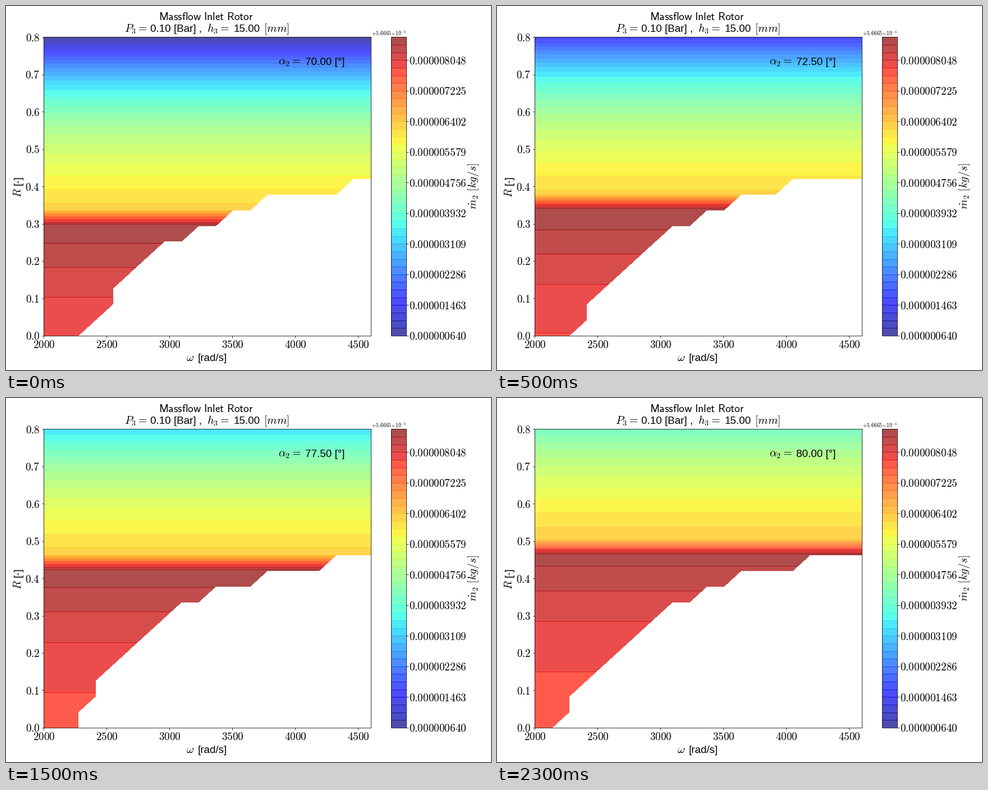
Animation, 864 px wide and 648 px high, one loop 2500 ms. Source, as a matplotlib script:

```python
import numpy as np
import matplotlib.pyplot as plt
from matplotlib.animation import FuncAnimation

W, H = 864, 648
N = 20
FRAMES = 5
TICK, SANS, MATH = 19.2, 18.7, 20

plt.rcParams["mathtext.fontset"] = "cm"
fig = plt.figure(figsize=(W / 72, H / 72), dpi=72, facecolor="white")


def box(left, top, right, bottom):
    """Axes placed by pixel edges, measured from the top left."""
    return fig.add_axes([left / W, 1 - bottom / H,
                         (right - left) / W, (bottom - top) / H])


def label(x, y, text, size=MATH, rotation=0, **kw):
    """Text whose baseline starts at pixel (x, y)."""
    return fig.text(x / W, 1 - y / H, text, fontsize=size, rotation=rotation,
                    rotation_mode="anchor", va="baseline", **kw)


def sans(x, y, text, rotation=0):
    return label(x, y, text, SANS, rotation, family="Liberation Sans")


# Mass flow in 1e-6 kg/s above the colour bar offset
levels = np.linspace(0.640, 8.6654, 40)
step = levels[1] - levels[0]
omega = np.linspace(2000, 4600, N)
react = np.linspace(0, 0.8, N)
rows = np.arange(N)


def through(*points):
    """Polynomial through a few key points."""
    x, y = zip(*points)
    return np.poly1d(np.polyfit(x, y, len(points) - 1))


# Level index against reaction degree, below and above the jump
choked = through((-0.026, 35), (0.104, 36), (0.248, 38), (0.3035, 39))
free = through((0.354, 27), (0.428, 25), (0.515, 22), (0.659, 14), (0.8, 0))


def too_fast(n):
    """Grid points beyond the speed limit, which rises with reaction."""
    slope = 0.1695 + 0.0003 * (n - 2) ** 4
    limit = 3.255 + 0.105 * n - slope * rows - 0.0085 * rows ** 2
    return limit[:, None] > 1000 * ((omega[1] - omega[0]) / omega) ** 2


def mass_flow(n):
    """Both branches slide upwards as the flow angle grows."""
    bend = 0.0037 * n * n
    low = choked((react - 0.0298 * n - bend) / (1 + 0.007 * n))
    high = free(react - 0.0315 * n - bend)
    index = np.clip(np.where(rows <= 7 + n, low, high), 0.01, 38.99)
    flow = np.tile((levels[0] + step * index)[:, None], (1, N))
    return np.ma.masked_where(too_fast(n), flow)


ax = box(67.4, 55.4, 649.8, 586.8)
maps = [ax.contourf(omega, react, mass_flow(n), levels=levels,
                    cmap="jet", alpha=0.7) for n in range(FRAMES)]
ax.set_xlim(2000, 4600)
ax.set_ylim(0, 0.8)
ax.set_xticks(range(2000, 4501, 500))
ax.set_yticks(np.arange(9) / 10)
ax.xaxis.set_major_formatter(lambda v, _: f"${v:.0f}$")
ax.yaxis.set_major_formatter(lambda v, _: f"${v:.1f}$")
ax.tick_params(labelsize=TICK)

cax = box(686.4, 55.4, 713, 586.8)
bar = fig.colorbar(maps[0], cax=cax, ticks=levels[::4])
cax.yaxis.set_major_formatter(lambda v, _: f"${v * 1e-6:.9f}$")
cax.tick_params(labelsize=TICK, pad=2)
# Neighbouring bands overlap by one pixel
cax.hlines(levels[1:-1], 0, 1, linewidth=1, alpha=0.7,
           colors=plt.get_cmap("jet")(np.linspace(0, 1, len(levels) - 2)))
label(714, 52, r"$+5.6665{\times}10^{-1}$", 9.8, ha="right")

label(356.5, 25, r"$\mathsf{Massflow\ Inlet\ Rotor}$", 19.4, ha="center")
label(211, 46.5, "$P_3 =$")
sans(257, 46.5, "0.10 [Bar] ,")
label(358.5, 46.5, "$h_3 =$")
sans(406, 46.5, "15.00")
label(459, 46.5, "$[mm]$")

label(321, 632, r"$\omega$")
sans(342, 632, "[rad/s]")
label(27, 341, "$R$", rotation=90)
sans(27, 319, "[-]", 90)
label(838, 362, r"$\dot{m}_2\ [kg/s]$", rotation=90)

label(485, 105, r"$\alpha_2 =$")
angle = sans(533, 105, "")


def update(n):
    for i, m in enumerate(maps):
        m.set_visible(i == n)
    angle.set_text(f"{70 + 2.5 * n:.2f} [°]")
    return [*maps, angle]


anim = FuncAnimation(fig, update, frames=FRAMES, interval=500,
                     repeat=True, repeat_delay=0, blit=False)
plt.show()
```
